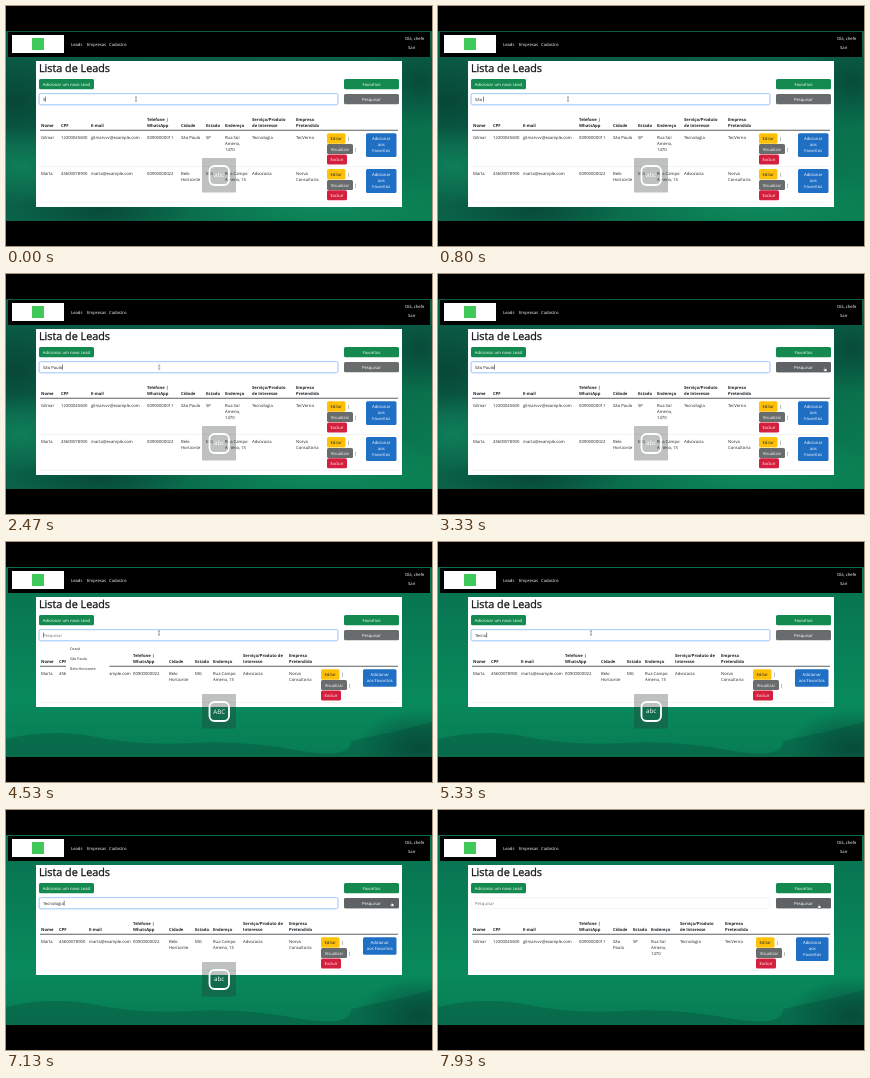
These frames come from a looping animation (426 by 240 pixels, 8 s). An HTML page:

```html
<!DOCTYPE html>
<html lang="pt-BR">
<head>
<meta charset="utf-8">
<title>Lista de Leads</title>
<style>
html, body { margin: 0; width: 100%; height: 100%; overflow: hidden; background: #000; }
svg { display: block; width: 100vw; height: 100vh; }
text { font: 4.2px "Open Sans", "Noto Sans", sans-serif; fill: #212529; white-space: pre; text-rendering: geometricPrecision; }
.title { font-size: 10.8px; font-weight: 500; fill: #15181b; stroke: #15181b; stroke-width: .3px; }
.bold { font-weight: 700; }
.white { fill: #fff; }
.muted { fill: #6c757d; }
.mid { text-anchor: middle; }
.caps { font-size: 6.2px; fill: #fff; text-anchor: middle; }

.timed, #cursor { animation: 8s step-end infinite; }
#bright { animation-name: later; }
#all { animation-name: all; }
#second { animation-name: second; }
#third { animation-name: third; }
#focus { animation-name: focus; }
#hover { animation-name: pointing; }
#menu { animation-name: menu; }
#badge { animation-name: badge; }
#upper { animation-name: upper; }
#lower { animation-name: lower; }
#beam { animation-name: beam; }
#hand { animation-name: pointing; }
#cursor { animation-name: move; animation-timing-function: ease-in-out; }
@keyframes later { 0% { opacity: 0; } 45% { opacity: 1; } }
@keyframes all { 0% { opacity: 1; } 45% { opacity: 0; } }
@keyframes second { 0% { opacity: 0; } 45% { opacity: 1; } 93% { opacity: 0; } }
@keyframes third { 0% { opacity: 0; } 93% { opacity: 1; } }
@keyframes focus { 0% { opacity: 1; } 45% { opacity: 0; } 54.5% { opacity: 1; } 93% { opacity: 0; } }
@keyframes menu { 0% { opacity: 0; } 54.5% { opacity: 1; } 59% { opacity: 0; } }
@keyframes badge { 0% { opacity: 1; } 93% { opacity: 0; } }
@keyframes upper { 0% { opacity: 0; } 52% { opacity: 1; } 61% { opacity: 0; } }
@keyframes lower { 0% { opacity: 1; } 52% { opacity: 0; } 61% { opacity: 1; } }
@keyframes beam { 0% { opacity: 1; } 37% { opacity: 0; } 48% { opacity: 1; } 85.5% { opacity: 0; } }
@keyframes pointing { 0% { opacity: 0; } 37% { opacity: 1; } 48% { opacity: 0; } 85.5% { opacity: 1; } }
@keyframes move {
  0%, 29% { transform: translate(130px, 93px); }
  38%, 46.5% { transform: translate(387px, 95px); }
  53.5%, 79% { transform: translate(153px, 91px); }
  86.5%, 93% { transform: translate(386px, 94px); }
  98%, 100% { transform: translate(381px, 96px); }
}
</style>
</head>
<body>
<svg viewBox="0 0 426 240" preserveAspectRatio="none">
  <defs>
    <linearGradient id="sky" x1="0" y1="0" x2="1" y2="1">
      <stop offset="0" stop-color="#0a5a45"/>
      <stop offset=".45" stop-color="#0a5f47"/>
      <stop offset="1" stop-color="#0a8052"/>
    </linearGradient>
    <linearGradient id="dawn" x1="0" y1="0" x2="0" y2="1">
      <stop offset="0" stop-color="#08704f"/>
      <stop offset=".7" stop-color="#088a5c"/>
      <stop offset="1" stop-color="#087c54"/>
    </linearGradient>
    <radialGradient id="shade">
      <stop offset="0" stop-color="#063e32" stop-opacity=".7"/>
      <stop offset="1" stop-color="#063e32" stop-opacity="0"/>
    </radialGradient>
    <radialGradient id="glow">
      <stop offset="0" stop-color="#13a06a" stop-opacity=".5"/>
      <stop offset="1" stop-color="#13a06a" stop-opacity="0"/>
    </radialGradient>
    <clipPath id="screen"><rect y="25" width="426" height="190"/></clipPath>
  </defs>

  <rect width="426" height="240"/>
  <g clip-path="url(#screen)">
    <rect y="25" width="426" height="190" fill="url(#sky)"/>
    <ellipse cx="10" cy="95" rx="60" ry="45" fill="url(#shade)"/>
    <ellipse cx="95" cy="205" rx="90" ry="28" fill="url(#shade)"/>
    <ellipse cx="415" cy="75" rx="50" ry="45" fill="url(#shade)"/>
    <ellipse cx="15" cy="160" rx="70" ry="40" fill="url(#glow)"/>
    <ellipse cx="310" cy="195" rx="130" ry="40" fill="url(#glow)"/>
    <g id="bright" class="timed">
      <rect y="25" width="426" height="190" fill="url(#dawn)"/>
      <path d="M0 197Q45 186 90 195T185 201T290 208T345 199L395 188L426 180V215H0Z" fill="#07553f" fill-opacity=".45"/>
      <ellipse cx="415" cy="205" rx="65" ry="38" fill="url(#shade)"/>
    </g>
    <rect x="2" y="26" width="422" height="25"/>
  </g>

  <rect x="6" y="29" width="52" height="18" fill="#fff"/>
  <rect x="26" y="32" width="12" height="12" fill="#3fc95a"/>
  <text class="white" x="65" y="39.7">Leads</text>
  <text class="white" x="81" y="39.7">Empresas</text>
  <text class="white" x="103" y="39.7">Cadastro</text>
  <text class="white" x="399" y="34.2">Olá, chefe</text>
  <text class="white" x="402" y="43.2">Sair</text>

  <g id="page"></g>

  <g id="menu" class="timed">
    <rect x="60" y="101" width="43.5" height="34" fill="#fff"/>
    <g style="font-size:3.7px">
      <text style="font-size:inherit" x="64" y="108">Ceará</text>
      <text style="font-size:inherit" x="64" y="118">São Paulo</text>
      <text style="font-size:inherit" x="64" y="128">Belo Horizonte</text>
    </g>
  </g>

  <g id="badge" class="timed">
    <rect x="196" y="152" width="34" height="34.5" rx="1" fill="#28322e" fill-opacity=".3"/>
    <rect x="203.5" y="160" width="19.5" height="19" rx="5" fill="none" stroke="#fff" stroke-width="1.8"/>
    <text id="upper" class="caps timed" x="213.2" y="171.6">ABC</text>
    <text id="lower" class="caps timed" x="213.2" y="171.4">abc</text>
  </g>

  <g id="cursor">
    <path id="beam" class="timed" d="M-1-2h2M0-2v4M-1 2h2" fill="none" stroke="#444" stroke-width=".5"/>
    <path id="hand" class="timed" d="M-.6-2.2h1v1.7l1.6.5v1.4l-.6 1h-2l-1.4-1.8.4-.5 1 .5z" fill="#fff" stroke="#111" stroke-width=".4"/>
  </g>
</svg>

<script>
const rect = (x, y, w, h, fill, extra = '') =>
  `<rect x="${x}" y="${y}" width="${w}" height="${h}" fill="${fill}" ${extra}/>`;
const label = (x, y, str, cls = '') => `<text class="${cls}" x="${x}" y="${y}">${str}</text>`;
const lines = (x, y, str, cls) =>
  str.split('/').map((part, i) => label(x, y + i * 6.3, part.replace('~', '/'), cls)).join('');
const button = (x, y, w, h, fill, str, cls = 'white') =>
  rect(x, y, w, h, fill, 'rx="1.5"') + lines(x + w / 2, y + 6.6, str, cls + ' mid');

const GREEN = '#158a50', GRAY = '#686c6c';

const lead = (name, doc, mail, phone, city, state, street, service, firm) =>
  [name, doc, mail, phone, city, state, street, service, firm];
const techLead = city => lead('Gilmar', '12300045600', 'gilmarvvv@example.com', '00900000011',
  city, 'SP', 'Rua Sol/Ameno,/1470', 'Tecnologia', 'TecVerno');
const lawLead = lead('Marta', '45600078900', 'marta@example.com', '00900000022',
  'Belo/Horizonte', 'MG', 'Rua Campo/Ameno, 15', 'Advocacia', 'Norva/Consultoria');

function row(cells, cols, y, actionX, addX, addText) {
  const top = y - 5.4;
  return cells.map((c, i) => lines(cols[i], y, c)).join('') +
    button(actionX, top, 18.5, 10.5, '#ffc107', 'Editar', '') +
    label(actionX + 20, top + 6.6, '|') +
    button(actionX, top + 10.8, 26, 10, GRAY, 'Visualizar') +
    label(actionX + 27, top + 17.4, '|') +
    button(actionX, top + 21.2, 20, 10, '#d3203f', 'Excluir') +
    button(addX, top, 390.5 - addX, addText.split('/').length * 6.3 + 5, '#1f6fc4', addText) +
    rect(34, y + 27.4, 358, .4, '#dee2e6');
}

function scene(id, height, cols, service, actionX, addX, addText, rows) {
  const heads = ['Nome', 'CPF', 'E-mail', 'Telefone |/WhatsApp', 'Cidade', 'Estado', 'Endereço',
    service, 'Empresa/Pretendida'];
  return `<g id="${id}" class="timed">` + rect(30, 55, 366, height, '#fff') +
    heads.map((h, i) => lines(cols[i], h.includes('/') ? 114.7 : 121, h, 'bold')).join('') +
    rect(34, 123.8, 358, .8, '#343a40') +
    rows.map((r, i) => row(r, cols, 132.6 + i * 35.9, actionX, addX, addText)).join('') + '</g>';
}

document.getElementById('page').innerHTML =
  scene('all', 146, [35, 55, 85, 141, 175, 200, 219, 246, 290], 'Serviço~Produto/de Interesse',
    321, 360, 'Adicionar/aos/Favoritos', [techLead('São Paulo'), lawLead]) +
  scene('second', 110, [35, 53, 83, 127, 163, 189, 207, 237, 283], 'Serviço~Produto de/Interesse',
    315, 357, 'Adicionar/aos Favoritos', [lawLead]) +
  scene('third', 110, [35, 55, 85, 141, 175, 195, 213, 242, 287], 'Serviço~Produto/de Interesse',
    318, 358, 'Adicionar/aos/Favoritos', [techLead('São/Paulo')]) +
  label(33, 66.2, 'Lista de Leads', 'title') +
  button(33, 73, 55, 10.3, GREEN, 'Adicionar um novo Lead') +
  button(338, 73, 55, 10.3, GREEN, 'Favoritos') +
  button(338, 88, 55, 10.3, GRAY, 'Pesquisar') +
  `<g id="hover" class="timed">${button(338, 88, 55, 10.3, '#5e6264', 'Pesquisar')}</g>` +
  rect(33.2, 87.7, 298.6, 11, '#fff', 'rx="1.5" stroke="#e3e6ea" stroke-width=".4"') +
  '<g id="focus" class="timed">' +
  rect(33, 87.5, 299, 11.4, 'none', 'rx="1.8" stroke="#d3e5fe" stroke-width="1.2"') +
  rect(33.2, 87.7, 298.6, 11, '#fff', 'rx="1.5" stroke="#7fb2fe" stroke-width=".6"') +
  '<rect id="caret" y="90.6" width=".5" height="5" fill="#111"/></g>' +
  '<text id="query" x="37" y="94.8"></text>';

const query = document.getElementById('query');
const caret = document.getElementById('caret');
const cityKeys = [0, 400, 600, 800, 1100, 1300, 1500, 1750, 1900];

function typed(t) {
  if (t < 3600) return 'São Paulo'.slice(0, cityKeys.filter(k => k <= t).length);
  if (t < 4720 || t >= 7440) return '';
  return 'Tecnologia'.slice(0, Math.floor((t - 4720) / 140) + 1);
}

let start;
function draw(now) {
  start ??= now;
  const str = typed((now - start) % 8000);
  query.textContent = str;
  caret.setAttribute('x', 37.1 + (str ? query.getComputedTextLength() : 0));
  if (!str) query.textContent = 'Pesquisar';
  query.setAttribute('class', str ? '' : 'muted');
  requestAnimationFrame(draw);
}
requestAnimationFrame(draw);
</script>
</body>
</html>
```
